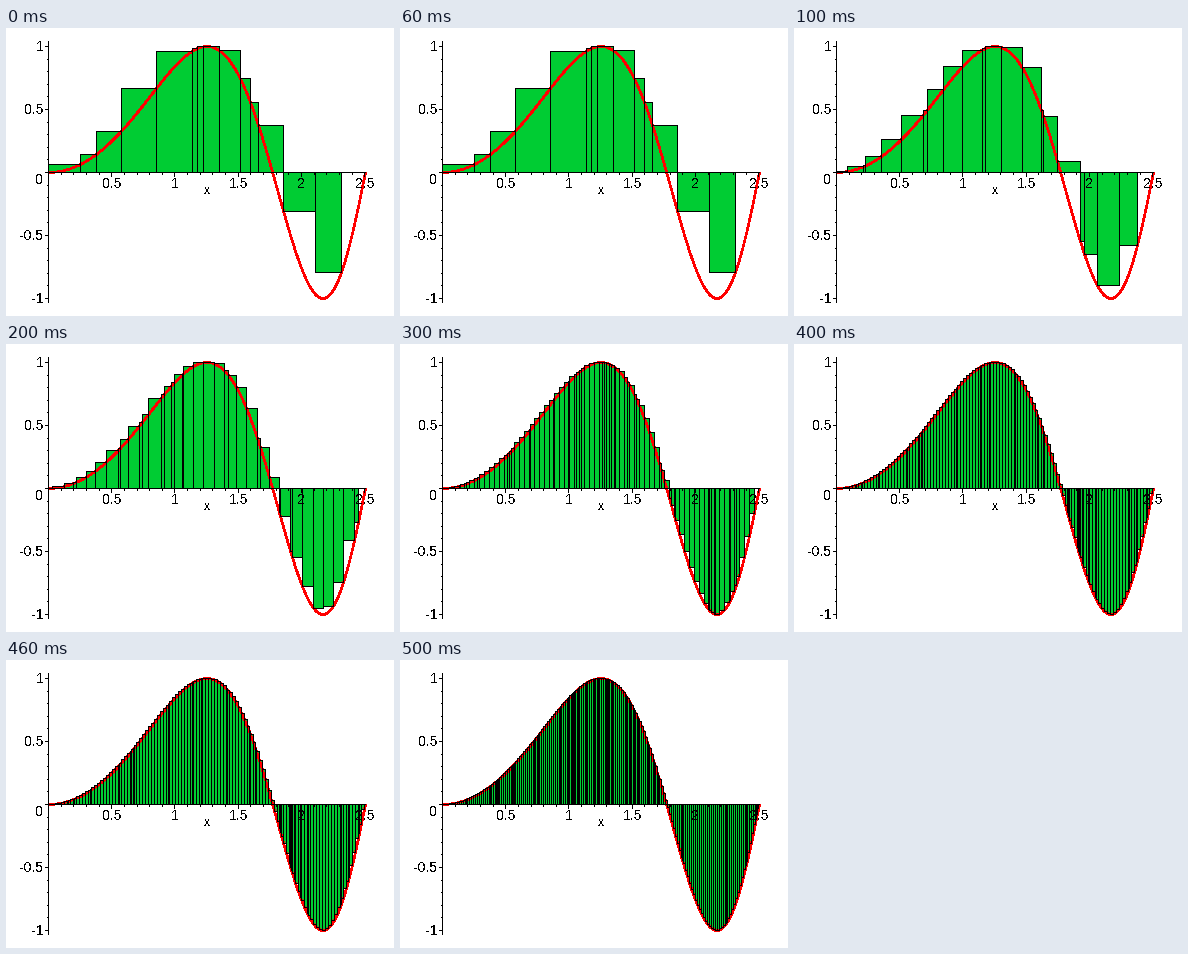
Animation, 388 px wide and 288 px high, one loop 600 ms. Source, as a matplotlib script:

```python
import numpy as np
import matplotlib.pyplot as plt
from matplotlib.animation import FuncAnimation

plt.rcParams.update({
    "font.family": "Liberation Sans",
    "text.antialiased": False,
    "path.simplify": False,
    "toolbar": "None",
})

W, H, DPI = 388, 288, 100
PX = 72 / DPI                        # one pixel in points
X0, X1, Y0 = 42, 359, 144            # axis start, axis end, zero line
X_MAX = np.sqrt(2 * np.pi)
X_UNIT = (X1 - X0) / X_MAX
Y_UNIT = 126
PEAK = np.sqrt(np.pi / 2)

fig = plt.figure(figsize=(W / DPI, H / DPI), dpi=DPI, facecolor="white")
ax = fig.add_axes([0, 0, 1, 1])
ax.set(xlim=(0, W), ylim=(H, 0))
ax.axis("off")


def to_px(x):
    return X0 + X_UNIT * x


def to_py(y):
    return Y0 - Y_UNIT * y


def f(x):
    return np.sin(x ** 2)


def refined_cuts(step, seed):
    """Nearly even cuts, some followed closely by a second one."""
    rng = np.random.default_rng(seed)
    cuts = np.arange(X0 + 0.4 * step, X1, step)
    cuts += rng.uniform(-0.1, 0.1, len(cuts)) * step
    doubled = rng.choice(cuts, int(0.4 * len(cuts)), replace=False)
    return np.concatenate([cuts, doubled + rng.uniform(1, 4, len(doubled))])


def upper_sum(cuts):
    """Pixel edges and bar ends for the upper Riemann sum."""
    edges = np.clip(np.rint(np.concatenate([[X0], cuts, [X1]])), X0, X1)
    edges = np.unique(edges)
    x = (edges - X0) / X_UNIT
    left, right = x[:-1], x[1:]
    top = np.maximum(f(left), f(right))
    top[(left <= PEAK) & (PEAK <= right)] = 1
    return edges, np.rint(to_py(top))


COARSE_CUTS = [74, 90, 115, 150, 186, 191, 197, 213, 234, 244, 252, 277,
               309, 335]
STEPS = (19.6, 10.8, 5, 3, 2)
SUMS = [upper_sum(COARSE_CUTS)]
SUMS += [upper_sum(refined_cuts(step, seed))
         for seed, step in enumerate(STEPS)]


def segment(xs, ys):
    ax.plot(xs, ys, color="black", lw=PX, aa=False, zorder=4,
            solid_capstyle="projecting")


def label(x, y, text, size=14, ha="center"):
    ax.text(x, y, text, fontsize=size * PX, ha=ha, va="baseline",
            color="black", zorder=5)


bars = ax.stairs([Y0], [X0, X1], baseline=Y0, fill=True, color="#00cc33",
                 lw=0, antialiased=False, zorder=1)
xs = np.linspace(0, X_MAX, 300)
ax.plot(to_px(xs) + 0.5, to_py(f(xs)) + 0.5, color="red", lw=1.6 * PX,
        aa=False, zorder=2, solid_capstyle="butt")
outline, = ax.plot([], [], color="black", lw=PX, aa=False, zorder=3,
                   solid_joinstyle="miter", solid_capstyle="projecting")

# Axes with a tick every 0.1 and a longer one every 0.5
segment([X0, X1 - 1], [Y0, Y0])
segment([X0, X0], [13, 274])
for i in range(1, 26):
    px = np.rint(to_px(i / 10))
    segment([px, px], [Y0, Y0 + (4 if i % 5 == 0 else 2)])
for i in range(-10, 11):
    py = np.rint(to_py(i / 10))
    segment([X0 - (3 if i % 5 == 0 else 1), X0], [py, py])

for value in (0.5, 1, 1.5, 2, 2.5):
    label(to_px(value) + 0.5, 160, f"{value:g}")
for value in (1, 0.5, -0.5, -1):
    label(37.5, to_py(value) + 5, f"{value:g}", ha="right")
label(33.5, 156, "0")
label(200.5, 166, "x", size=12)


def update(i):
    edges, tops = SUMS[i]
    left, right = edges[:-1], edges[1:]
    base, gap = np.full_like(tops, Y0), np.full_like(tops, np.nan)
    bars.set_data(tops, edges)
    outline.set_data(np.column_stack([left, left, right, right, gap]).ravel(),
                     np.column_stack([base, tops, tops, base, gap]).ravel())
    return bars, outline


anim = FuncAnimation(fig, update, frames=len(SUMS), interval=100,
                     repeat=True, repeat_delay=0)
plt.show()
```
